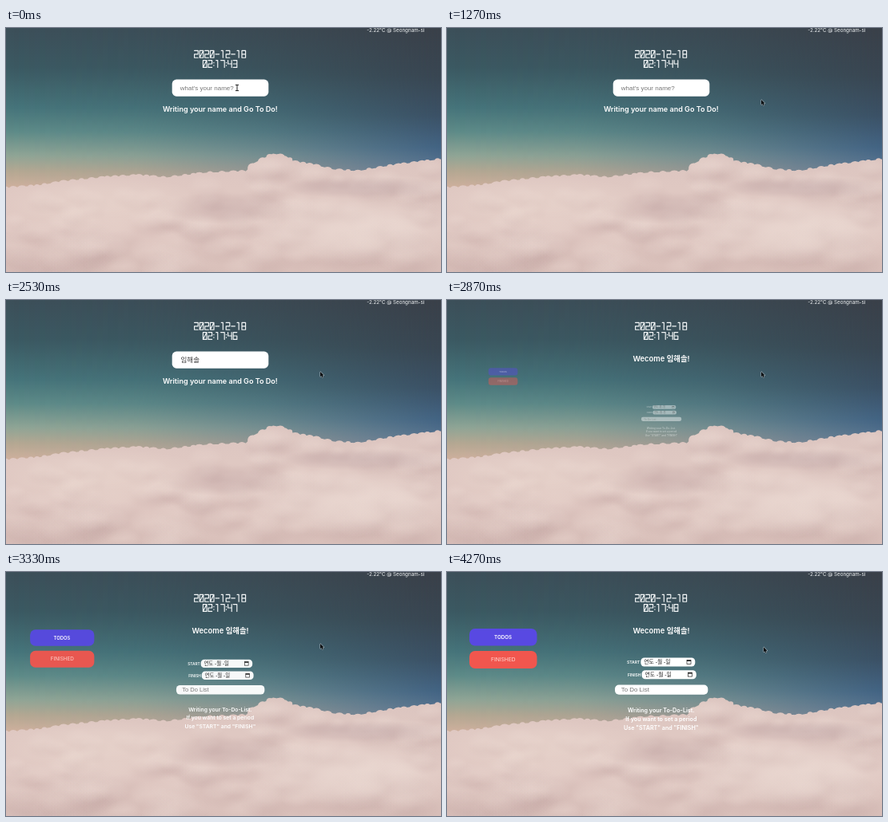
An HTML page with a canvas for the animation above (4.34 s loop, 544 by 306 pixels).

```html
<!DOCTYPE html>
<html lang="ko">
<head>
<meta charset="utf-8">
<title>To Do</title>
<style>
html, body { margin: 0; width: 100%; height: 100%; overflow: hidden; background: #3a4a55; }
canvas { display: block; width: 544px; height: 306px; }
</style>
</head>
<body>
<canvas id="stage"></canvas>
<script>
const W = 544, H = 306, LOOP = 4340;
const dpr = window.devicePixelRatio || 1;
const SANS = 'Inter, "Noto Sans CJK KR", "Noto Sans CJK", sans-serif';
const ARIAL = '"Liberation Sans", Arial, "Noto Sans CJK KR", sans-serif';
const NAME = '임해솔';

function layer(canvas) {
  canvas.width = W * dpr;
  canvas.height = H * dpr;
  const c = canvas.getContext('2d');
  c.scale(dpr, dpr);
  return c;
}

const ctx = layer(document.getElementById('stage'));
const scenery = document.createElement('canvas');
paintScenery(layer(scenery));

function random(seed) {
  return () => (seed = (seed * 16807) % 2147483647) / 2147483647;
}

function gradient(c, x0, y0, x1, y1, stops) {
  const g = c.createLinearGradient(x0, y0, x1, y1);
  stops.forEach(([at, color]) => g.addColorStop(at, color));
  return g;
}

function blob(c, x, y, rx, ry, rgb, alpha) {
  c.save();
  c.translate(x, y);
  c.scale(rx, ry);
  const g = c.createRadialGradient(0, 0, 0, 0, 0, 1);
  g.addColorStop(0, `rgba(${rgb},${alpha})`);
  g.addColorStop(0.55, `rgba(${rgb},${alpha * 0.6})`);
  g.addColorStop(1, `rgba(${rgb},0)`);
  c.fillStyle = g;
  c.fillRect(-1, -1, 2, 2);
  c.restore();
}

function paintScenery(c) {
  // Sky: a warm left side fading into a blue right side.
  c.fillStyle = gradient(c, 0, 0, 0, 200, [
    [0, '#3a4049'], [0.3, '#394652'], [0.55, '#3b5166'], [0.75, '#436484'], [1, '#6f86a0']]);
  c.fillRect(0, 0, W, H);
  const side = document.createElement('canvas');
  const s = layer(side);
  s.fillStyle = gradient(s, 0, 0, 0, 200, [
    [0, '#3c4f59'], [0.25, '#3b5962'], [0.5, '#46747a'], [0.65, '#5e8b88'],
    [0.8, '#90a595'], [0.9, '#b5a892'], [1, '#cfb09d']]);
  s.fillRect(0, 0, W, H);
  s.globalCompositeOperation = 'destination-in';
  s.fillStyle = gradient(s, 0, 0, W, 0, [
    [0, '#000'], [0.3, 'rgba(0,0,0,.9)'], [0.6, 'rgba(0,0,0,.6)'], [1, 'rgba(0,0,0,0)']]);
  s.fillRect(0, 0, W, H);
  c.drawImage(side, 0, 0, W, H);

  // Clouds: a bumpy skyline with soft puffs inside.
  const ridge = [[0, 200], [40, 197], [70, 192], [130, 186], [165, 184], [200, 187],
    [250, 181], [300, 179], [310, 169], [334, 157], [350, 160], [360, 167], [385, 171],
    [410, 177], [440, 179], [480, 172], [544, 164]];
  const top = x => {
    let i = 1;
    while (i < ridge.length - 1 && ridge[i][0] < x) i++;
    const [x0, y0] = ridge[i - 1], [x1, y1] = ridge[i];
    return y0 + (y1 - y0) * (x - x0) / (x1 - x0);
  };
  const rnd = random(71);
  const shape = new Path2D();
  shape.moveTo(0, H);
  ridge.forEach(([x, y]) => shape.lineTo(x, y + 0.5));
  shape.lineTo(W, H);
  shape.closePath();
  for (let x = 0; x < W + 8; x += 6 + rnd() * 9) {
    const r = 3 + rnd() * 6, y = top(Math.min(x, W)) + r - 1.2;
    shape.moveTo(x + r, y);
    shape.arc(x, y, r, 0, Math.PI * 2);
  }
  c.save();
  c.fillStyle = gradient(c, 0, 155, 0, H, [
    [0, '#dbc4bf'], [0.3, '#dfc8c2'], [0.65, '#dfc7c1'], [1, '#d9c0ba']]);
  c.fill(shape);
  c.clip(shape);
  for (let i = 0; i < 120; i++) {
    const x = rnd() * W, depth = rnd();
    const y = top(x) + 8 + depth * 115, r = 10 + rnd() * 16 + depth * 12;
    blob(c, x + 5, y + r * 0.55, r * 1.25, r * 0.6, '188,158,156', 0.16);
    blob(c, x, y, r, r * 0.65, '236,218,211', 0.28);
  }
  blob(c, 275, 226, 85, 20, '184,155,155', 0.4);
  blob(c, 450, 200, 110, 14, '184,158,160', 0.4);
  blob(c, 30, 290, 100, 30, '198,166,162', 0.3);
  blob(c, 430, 252, 150, 45, '235,218,211', 0.65);
  blob(c, 120, 222, 140, 36, '236,218,209', 0.5);
  c.restore();
}

function text(str, x, y, size, color, weight = 400, align = 'left', family = SANS) {
  ctx.font = `${weight} ${size}px ${family}`;
  ctx.textAlign = align;
  ctx.fillStyle = color;
  ctx.fillText(str, x, y);
}

function box(x, y, w, h, r, color) {
  ctx.fillStyle = color;
  ctx.beginPath();
  ctx.roundRect(x, y, w, h, r);
  ctx.fill();
}

// LCD digits: segments a..g, s slashes the zero, i and j form the one.
const LCD = {
  0: 'abcdefs', 1: 'ij', 2: 'abged', 3: 'abgcd', 4: 'fgbc', 5: 'afgcd',
  6: 'afgedc', 7: 'abc', 8: 'abcdefg', 9: 'abcdfg', '-': 'g'
};
const SEGMENT = {
  a: [0, 0, 1, 0], b: [1, 0, 1, 0.5], c: [1, 0.5, 1, 1], d: [0, 1, 1, 1],
  e: [0, 0.5, 0, 1], f: [0, 0, 0, 0.5], g: [0, 0.5, 1, 0.5], s: [0.1, 0.9, 0.9, 0.1],
  i: [0.6, 0, 0.6, 1], j: [0.15, 0, 0.6, 0]
};

function lcd(str, x, y) {
  const w = 4.6, h = 8.8;
  ctx.strokeStyle = ctx.fillStyle = '#f4f7f8';
  ctx.lineWidth = 1.15;
  ctx.lineCap = 'round';
  for (const ch of str) {
    if (ch === ':') {
      ctx.fillRect(x - 0.3, y + 2.3, 1.2, 1.3);
      ctx.fillRect(x - 0.3, y + 5.8, 1.2, 1.3);
      x += 2.4;
      continue;
    }
    ctx.beginPath();
    for (const id of LCD[ch]) {
      const [x0, y0, x1, y1] = SEGMENT[id];
      ctx.moveTo(x + x0 * w, y + y0 * h);
      ctx.lineTo(x + x1 * w, y + y1 * h);
    }
    ctx.stroke();
    x += 6.6;
  }
}

// Last value whose start time has passed.
function at(steps, t) {
  let value = steps[0][1];
  for (const [start, v] of steps) if (t >= start) value = v;
  return value;
}

// CSS "ease" timing curve.
function ease(p) {
  if (p <= 0) return 0;
  if (p >= 1) return 1;
  const bez = (a, b, u) => 3 * a * u * (1 - u) ** 2 + 3 * b * u * u * (1 - u) + u ** 3;
  let lo = 0, hi = 1;
  for (let i = 0; i < 24; i++) {
    const mid = (lo + hi) / 2;
    if (bez(0.25, 0.25, mid) < p) lo = mid; else hi = mid;
  }
  return bez(0.1, 1, lo);
}

const SECONDS = [[0, 43], [800, 44], [1470, 45], [1930, 46], [2930, 47], [3930, 48]];
// Typed text; the last syllable is underlined while composing.
const TYPED = [[0, ''], [1470, 'ㅇ'], [1530, '이'], [1600, '임'], [1730, '임ㅎ'],
  [1800, '임해'], [2000, '임햇'], [2130, '임해소'], [2400, NAME]];

function nameForm(t) {
  box(207.7, 64.6, 120.6, 21.1, 5.5, '#fff');
  const typed = at(TYPED, t);
  if (typed) {
    text(typed, 218.5, 78, 8.5, '#3a3a3a', 400, 'left', ARIAL);
    if (t < 2530) {
      const start = 218.5 + ctx.measureText(typed.slice(0, -1)).width;
      const width = ctx.measureText(typed.slice(-1)).width;
      ctx.fillRect(start, 79.2, width, 0.8);
    }
  } else {
    text("what's your name?", 217.8, 77.6, 8, '#777', 400, 'left', ARIAL);
    if (t >= 500 && t < 1000) {
      ctx.fillStyle = '#222';
      ctx.fillRect(218, 71, 0.8, 8.5);
    }
  }
  text('Writing your name and Go To Do!', 267.8, 105, 9.05, '#fff', 600, 'center');
}

function zoomed(cx, cy, k, draw) {
  ctx.save();
  ctx.globalAlpha = k;
  ctx.translate(cx, cy);
  ctx.scale(k, k);
  ctx.translate(-cx, -cy);
  draw();
  ctx.restore();
}

function dateField(label, x, y, w) {
  text(label, x - 1, y + 7.4, 5, '#fff', 600, 'right');
  box(x, y, w, 11, 4.5, '#fff');
  text('연도 -월 -일', x + 4, y + 7.7, 6.8, '#222', 400, 'left', ARIAL);
  const ix = x + w - 10.3, iy = y + 2.9;
  ctx.strokeStyle = ctx.fillStyle = '#222';
  ctx.lineWidth = 0.7;
  ctx.strokeRect(ix, iy, 5, 5);
  ctx.fillRect(ix, iy, 5, 1.5);
}

function todoPage(t) {
  text(`Wecome ${NAME}!`, 268, 76.8, 9.4, '#fff', 600, 'center');
  const k = ease((t - 2610) / 1000);
  zoomed(70, 95.9, k, () => {
    box(28, 71, 84.5, 21.5, 7, '#5849e2');
    box(28, 99, 84.5, 22, 7, '#f1564e');
    text('TODOS', 70, 84.1, 6.2, '#fff', 600, 'center');
    text('FINISHED', 70.3, 112.3, 6.7, '#ffd9d3', 400, 'center');
  });
  zoomed(268, 150.7, k, () => {
    dateField('START', 242.3, 107.5, 68);
    dateField('FINISH', 243.5, 123.2, 68.3);
    box(210, 141.5, 116.3, 12.2, 5, '#fff');
    text('To Do List', 217.8, 150.4, 7.9, '#777', 400, 'left', ARIAL);
    ['Writing your To-Do-List.', 'If you want to set a period', 'Use "START" and "FINISH"']
      .forEach((line, i) => text(line, 267.8, 176.2 + i * 10.9, 7.15, '#fff', 600, 'center'));
  });
}

function arrow(x, y) {
  ctx.save();
  ctx.translate(x, y);
  ctx.scale(0.9, 0.9);
  ctx.beginPath();
  [[0, 0], [0, 7], [1.6, 5.6], [2.8, 8.2], [4, 7.6], [2.9, 5.2], [5, 5]]
    .forEach(([dx, dy]) => ctx.lineTo(dx, dy));
  ctx.closePath();
  ctx.lineJoin = 'round';
  ctx.lineWidth = 0.9;
  ctx.strokeStyle = 'rgba(255,255,255,.65)';
  ctx.stroke();
  ctx.fillStyle = '#0c0f12';
  ctx.fill();
  ctx.restore();
}

function beam(x, y) {
  ctx.strokeStyle = '#222';
  ctx.lineWidth = 1;
  ctx.beginPath();
  ctx.moveTo(x, y - 3.6);
  ctx.lineTo(x, y + 3.6);
  for (const dy of [-3.6, 3.6]) {
    ctx.moveTo(x - 1.7, y + dy);
    ctx.lineTo(x + 1.7, y + dy);
  }
  ctx.stroke();
}

function pointer(t) {
  const p = Math.min(1, Math.max(0, (t - 430) / 440));
  const k = p * p * (3 - 2 * p);
  const x = 289 + 104 * k, y = 75 + 15 * k;
  if (t >= 4270) arrow(396, 94.2);
  else if (x < 328) beam(x, y);
  else arrow(x, y);
}

function draw(t) {
  ctx.drawImage(scenery, 0, 0, W, H);
  text('-2.22°C @ Seongnam-si', 523.3, 4.8, 6.25, '#f2f5f6', 400, 'right');
  lcd('2020-12-18', 235.6, 28.4);
  lcd('02:17:' + at(SECONDS, t), 246.4, 40.6);
  if (t < 2670) nameForm(t);
  else todoPage(t);
  pointer(t);
}

const began = performance.now();
function tick() {
  draw((performance.now() - began) % LOOP);
  requestAnimationFrame(tick);
}
tick();
</script>
</body>
</html>
```
